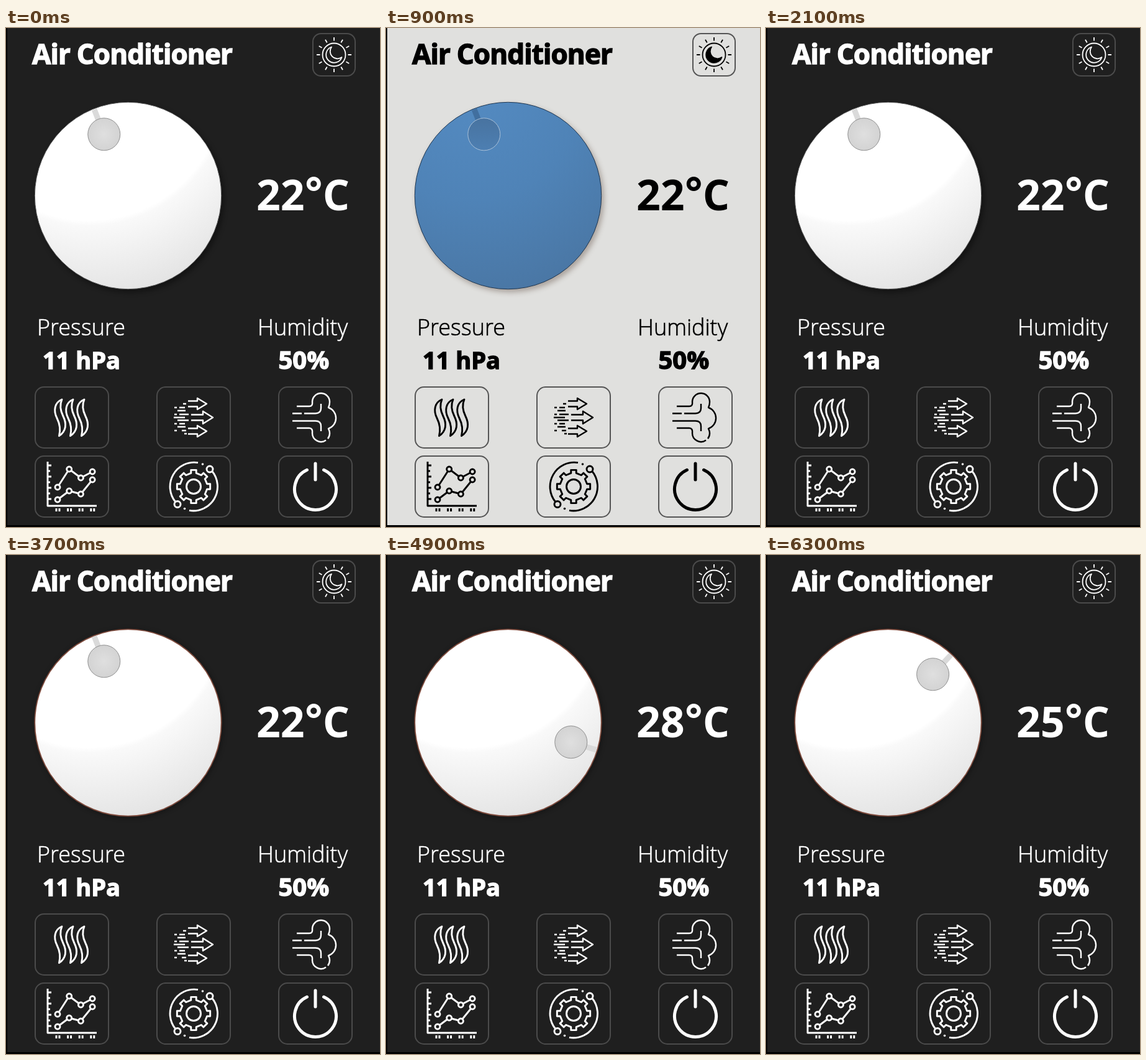
These frames come from a looping animation (602 px wide and 802 px high, 8000 ms). An HTML page:

```html
<!DOCTYPE html>
<html lang="en">
<head>
<meta charset="utf-8">
<title>Air Conditioner</title>
<style>
html, body { margin: 0; width: 100%; height: 100%; overflow: hidden; background: #000; }
svg {
  display: block; width: 100%; height: 100%; font-family: "Open Sans", "Noto Sans", sans-serif;
  --bg: #1f1f1f; --fg: #fff; --edge: #4b4b4b; --moon: none;
  --rim: #555; --knob: url(#knobDark); --knobRim: #8f8f8f; --notch: #dadada;
  --dial: url(#dialDark); --shadow: #000; --shade: .4;
}
svg.light {
  --bg: #e0e0de; --fg: #000; --edge: #555; --moon: #000;
  --rim: #1d3550; --knob: url(#knobLight); --knobRim: #a9c0d8; --notch: #416f9f;
  --dial: url(#dialLight); --shadow: #6a5a50; --shade: .45;
}
text { fill: var(--fg); stroke: var(--fg); stroke-width: 0; }
.bold { font-weight: 700; stroke-width: 1.4; }
.thin { font-weight: 300; font-size: 36px; stroke-width: .6; }
.box { fill: var(--bg); stroke: var(--edge); stroke-width: 2; }
.icon { fill: none; stroke: var(--fg); stroke-width: 2.4; stroke-linejoin: round; }
.fine { stroke-width: 1.8; }
.heavy { stroke-width: 2.9; }
.solid { fill: var(--fg); stroke: none; }
.dot { fill: var(--bg); }
#dial { fill: var(--dial); stroke: var(--rim); }
.hover #dial { stroke: #7d4a3c; stroke-width: 1.8; }
</style>
</head>
<body>
<svg id="stage" viewBox="0 0 602 802">
  <defs>
    <radialGradient id="dialDark" gradientUnits="userSpaceOnUse" cx="133" cy="90" r="340">
      <stop offset=".645" stop-color="#fff"/><stop offset=".67" stop-color="#f9f9f9"/>
      <stop offset="1" stop-color="#e4e4e4"/>
    </radialGradient>
    <radialGradient id="dialLight" gradientUnits="userSpaceOnUse" cx="133" cy="90" r="340">
      <stop offset="0" stop-color="#548bc2"/><stop offset=".55" stop-color="#4f83b7"/>
      <stop offset="1" stop-color="#4a77a5"/>
    </radialGradient>
    <radialGradient id="knobDark">
      <stop offset="0" stop-color="#dfdfdf"/><stop offset="1" stop-color="#d3d3d3"/>
    </radialGradient>
    <linearGradient id="knobLight" x2="0" y2="1">
      <stop offset="0" stop-color="#4873a0"/><stop offset="1" stop-color="#4d7fb2"/>
    </linearGradient>
    <filter id="blur"><feGaussianBlur stdDeviation="4"/></filter>
    <path id="flame" d="M90 597C78 602 76 615 82 627C87 637 88 646 85.5 655.5C97 648 98 636 92 624C87 614 86 606 90 597Z"/>
    <path id="arrow" d="M293 599.5H308V595L323 604L308 613V608.5H293"/>
  </defs>

  <rect x="2" width="600" height="799" style="fill:var(--bg)"/>
  <text class="bold" x="42" y="58" font-size="44" letter-spacing="-.88">Air Conditioner</text>
  <text x="403" y="293" font-size="68" font-weight="700"><tspan id="temp"></tspan><tspan dy="-5">°</tspan><tspan dy="5">C</tspan></text>
  <text class="thin" x="50" y="494">Pressure</text>
  <text class="thin" x="405" y="494">Humidity</text>
  <text class="bold" x="59" y="548" font-size="38">11 hPa</text>
  <text class="bold" x="438.5" y="548" font-size="40">50%</text>

  <g id="theme">
    <rect class="box" x="494" y="9" width="68" height="68" rx="13"/>
    <g class="icon fine">
      <circle cx="528" cy="43" r="18.5"/>
      <path id="rays"/>
      <path d="M524 30.5A13 13 0 1 0 540.5 47A11.8 11.8 0 0 1 524 30.5Z" style="fill:var(--moon)"/>
    </g>
  </g>

  <circle id="shade" r="151" filter="url(#blur)" style="fill:var(--shadow);opacity:var(--shade)"/>
  <circle id="dial" cx="196.5" cy="269.5" r="150.2"/>
  <path id="notch" d="M196.5 120.5V138" style="stroke:var(--notch);stroke-width:9"/>
  <circle id="knob" r="26" style="fill:var(--knob);stroke:var(--knobRim)"/>

  <g id="boxes"></g>
  <g class="icon">
    <g class="heavy"><use href="#flame"/><use href="#flame" x="18"/><use href="#flame" x="36"/></g>

    <use href="#arrow"/><use href="#arrow" y="44"/>
    <path d="M298 621.5H317V616L333 626L317 636V630.5H298"/>
    <path d="M285 604h5M271 610h4M279 610h9M276 615h13M271 621h4M279 621h15M270 626h18M276 630.5h18M271 636h4M279 636h9M276 641h13M271 647h4M283 647h7M287 652h4"/>

    <path d="M468 608H488Q494 608 493 601A14 14 0 1 1 521 601Q521 606 519 610A18 18 0 0 1 519 644Q521 648 521 651A14 14 0 0 1 518 660M515 662.5A14 14 0 0 1 493 651Q494 643 488 643H468"/>
    <path d="M461 619.5H476M480 619.5H498Q507 619.5 507 611V604M461 631.5H498Q507 631.5 507 640V648"/>

    <g class="heavy">
      <path d="M67 697V768H146M67 703h6M67 712h4M67 721h6M67 730h4M67 739h6M67 748h4M67 757h6"/>
      <path id="marks"/>
      <g id="graph"></g>
      <path id="gear"/>
      <circle cx="302" cy="737" r="11.5"/>
      <path d="M273 762A39 39 0 0 1 309 698.6M331.5 712A39 39 0 0 1 295 775.4"/>
      <circle cx="328" cy="709" r="5"/><circle cx="276" cy="765.5" r="5"/>
    </g>
    <circle class="solid" cx="316.5" cy="701" r="1.8"/><circle class="solid" cx="287.5" cy="772.5" r="1.8"/>

    <path d="M484.5 710.3A33.5 33.5 0 1 0 511.5 710.3M498 700V726" stroke-linecap="round" style="stroke-width:5"/>
  </g>
</svg>
<script>
const $ = id => document.getElementById(id);
const polar = (cx, cy, r, deg) => {
  const a = deg * Math.PI / 180;
  return [cx + r * Math.sin(a), cy - r * Math.cos(a)];
};
const range = n => [...Array(n).keys()];

$('rays').setAttribute('d', range(12).map(i =>
  `M${polar(528, 43, 22.5, i * 30)}L${polar(528, 43, 28, i * 30)}`).join(''));

$('gear').setAttribute('d', 'M' + range(8).flatMap(i =>
  [[22, -11], [27, -9], [27, 9], [22, 11]].map(([r, da]) =>
    polar(302, 737, r, i * 45 + da))).join('L') + 'Z');

$('marks').setAttribute('d', range(4).map(i =>
  `M${81 + i * 18.6} 772v5m5 0v-5`).join(''));

$('graph').innerHTML = [[738, 709, 723, 713], [758, 744, 749, 726]].map(ys => {
  const pts = ys.map((y, i) => [83 + i * 18.7, y]);
  return `<polyline points="${pts.join(' ')}"/>` +
    pts.map(([x, y]) => `<circle class="dot" cx="${x}" cy="${y}" r="4"/>`).join('');
}).join('');

$('boxes').innerHTML = range(6).map(i =>
  `<rect class="box" x="${47 + i % 3 * 196}" y="${577 + (i > 2) * 111}" width="118" height="98" rx="14"/>`).join('');

// [time, degrees]; past 30 the dial wraps to 16
const turns = [[0, 22], [4100, 23], [4200, 24], [4400, 25], [4500, 26], [4700, 27],
  [4900, 28], [5000, 29], [5100, 30], [5300, 16], [5500, 17], [6300, 25]];

function draw(t) {
  const light = t >= 500 && t < 1700;
  const pressed = (t >= 500 && t < 900) || (t >= 1800 && t < 2100);
  const hover = t >= 3700;
  const temp = turns.findLast(([at]) => t >= at)[1];
  const angle = (temp - 23) * 150 / 7;
  const [x, y] = polar(196.5, 269.5, 106, angle);

  $('stage').setAttribute('class', light ? 'light' : hover ? 'hover' : '');
  $('theme').setAttribute('transform', `translate(0 ${pressed ? 2 : 0})`);
  $('shade').setAttribute('cx', hover ? 198 : 200);
  $('shade').setAttribute('cy', hover ? 271 : 274);
  $('notch').setAttribute('transform', `rotate(${angle} 196.5 269.5)`);
  $('knob').setAttribute('cx', x);
  $('knob').setAttribute('cy', y);
  $('temp').textContent = temp;
}

const start = performance.now();
function tick() {
  draw((performance.now() - start) % 8000);
  requestAnimationFrame(tick);
}
tick();
</script>
</body>
</html>
```
